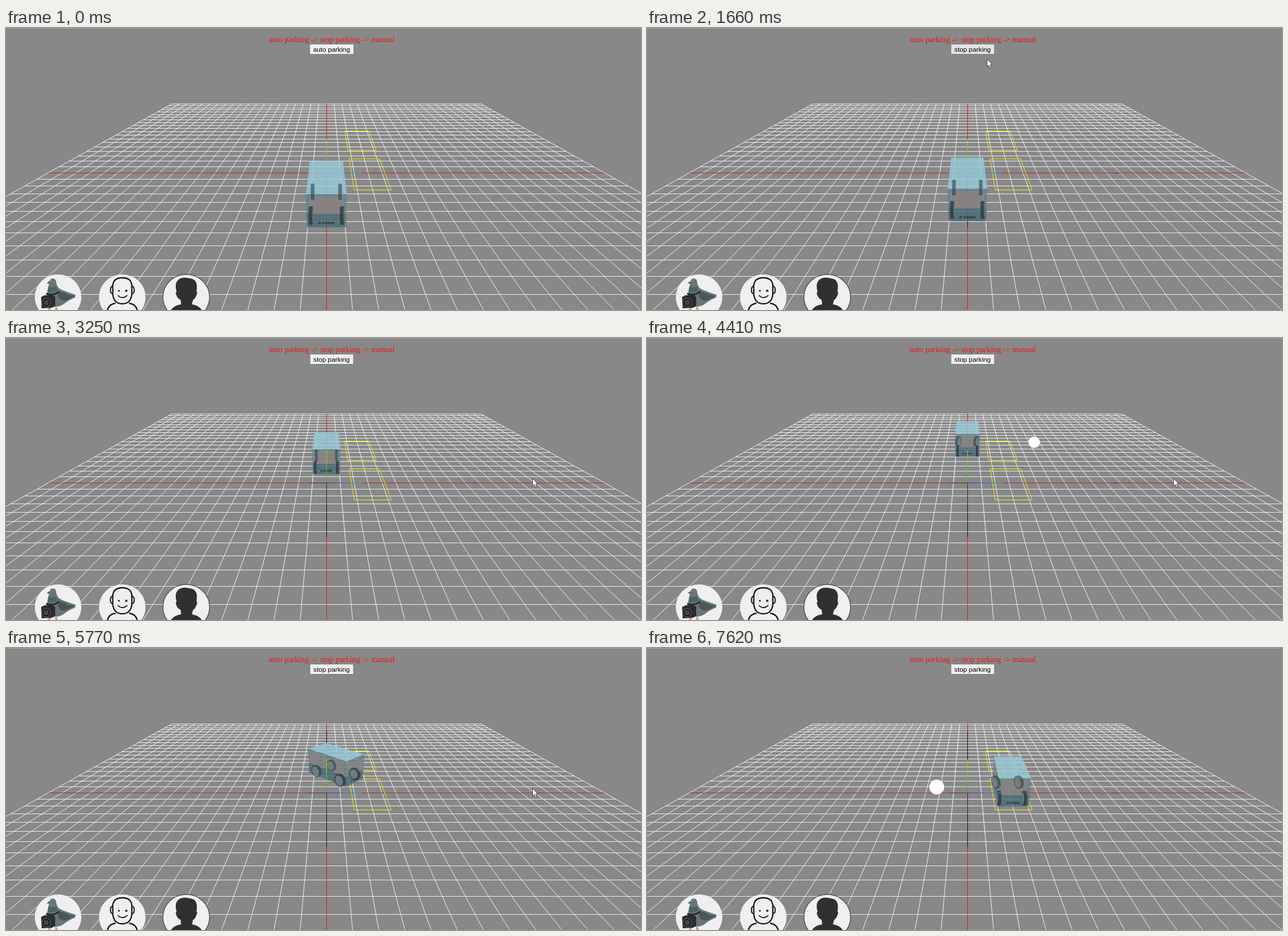
An HTML page with a canvas that plays this animation: 1122x499 px, repeating every 8260 ms.

```html
<!DOCTYPE html>
<html lang="en">
<head>
<meta charset="utf-8">
<title>Auto parking</title>
<style>
  html, body { margin: 0; width: 100%; height: 100%; overflow: hidden; background: #888; }
  canvas { display: block; }
</style>
</head>
<body>
<canvas id="stage" width="1122" height="499"></canvas>
<script>
const ctx = document.getElementById('stage').getContext('2d');
const LOOP = 8260;
const CX = 566.1, CY = 256.1, FOCAL = 549;
const DIST = Math.hypot(5, 10), SIN = 5 / DIST, COS = 10 / DIST;

// Parking manoeuvre: straight ahead, arc to the right, arc to the left.
const R = 2.53, AXLE = 0.55, WHEEL_Z = 0.65;
const TURN = Math.acos(1 - 0.75 / R);
const START_Z = 2.79, TURN_Z = -2.98, END_Z = 0.57;

const clamp = v => Math.min(1, Math.max(0, v));
const span = (t, a, b) => clamp((t - a) / (b - a));
const ease = p => (1 - Math.cos(Math.PI * p)) / 2;
const mix = (a, b, p) => a + (b - a) * p;
const pixelCentre = v => Math.floor(v) + 0.5;

function project(x, y, z) {
  const depth = DIST - COS * z - SIN * y, scale = FOCAL / depth;
  return { x: CX + x * scale, y: CY - (COS * y - SIN * z) * scale, scale, depth };
}

function fillPoly(points, color) {
  ctx.beginPath();
  points.forEach(p => ctx.lineTo(p.x, p.y));
  ctx.closePath();
  ctx.fillStyle = color;
  ctx.fill();
}

// Axis-aligned lines are snapped so that they stay one crisp pixel wide.
function line(x1, y1, x2, y2, color) {
  if (Math.abs(x1 - x2) < 0.01) x1 = x2 = pixelCentre(x1);
  if (Math.abs(y1 - y2) < 0.01) y1 = y2 = pixelCentre(y1);
  ctx.beginPath();
  ctx.moveTo(x1, y1);
  ctx.lineTo(x2, y2);
  ctx.strokeStyle = color;
  ctx.lineWidth = 1;
  ctx.stroke();
}

function groundLine(x1, z1, x2, z2, color) {
  const a = project(x1, 0, z1), b = project(x2, 0, z2);
  line(a.x, a.y, b.x, b.y, color);
}

function drawGrid() {
  for (let i = -20; i <= 20; i++) {
    if (!i) continue;
    groundLine(i / 2, -10, i / 2, 10, '#f4f4f4');
    groundLine(-10, i / 2, 10, i / 2, '#f0f0f0');
  }
  groundLine(-10, 0, 10, 0, '#d81c1c');
  groundLine(0, -10, 0, 10, '#f01010');
}

function drawSlot(z) {
  const far = z - 1.25, near = z + 1.25, color = '#f4f000';
  groundLine(0.9, far, 2.1, far, color);
  groundLine(0.9, near, 2.1, near, color);
  groundLine(0.9, far, 0.9, near, color);
  groundLine(2.1, far, 2.1, near, color);
}

// Lines the car has passed over stay discoloured.
function drawTrail(t, car) {
  if (t > 620) line(825, CY, 834, CY, '#343c3c');
  if (t < 1200) return;
  const front = t > 4480 ? -8.3 : car.z + 0.3;
  const back = 3.24;
  if (front >= back) return;
  for (const x of [-0.5, 0.5]) groundLine(x, front, x, back, '#cfe4e9');
  groundLine(0, front, 0, back, '#141010');
  if (front < 0) {
    groundLine(0, 0, 0, Math.min(back, 1.5), '#581616');
    line(533, CY, 566, CY, '#5c2c2c');
  }
}

function drawAxes() {
  const tip = project(0, 1.25, 0);
  const up = ctx.createLinearGradient(0, CY, 0, tip.y);
  up.addColorStop(0, '#20c010');
  up.addColorStop(1, '#a8e000');
  line(CX, CY, CX, tip.y, up);
  const side = ctx.createLinearGradient(CX, 0, CX + 62, 0);
  side.addColorStop(0, '#2434c8');
  side.addColorStop(0.4, '#3060c0');
  side.addColorStop(1, '#5890a0');
  line(CX, CY, CX + 62, CY, side);
}

function carState(t) {
  const first = ease(span(t, 4480, 5390)), second = ease(span(t, 6130, 7640));
  const curve = (span(t, 4035, 4470) - 2 * span(t, 5400, 6130)) / R;
  let x = 0, z = mix(START_Z, TURN_Z, ease(span(t, 1200, 4500))), angle = 0;
  if (second > 0) {
    angle = TURN * (1 - second);
    x = 1.5 - R + R * Math.cos(angle);
    z = END_Z - R * Math.sin(angle);
  } else if (first > 0) {
    angle = TURN * first;
    x = R - R * Math.cos(angle);
    z = TURN_Z + R * Math.sin(angle);
  }
  return { x, z, angle, curve };
}

function hull(points) {
  const sorted = [...points].sort((a, b) => a.x - b.x || a.y - b.y);
  const half = list => list.reduce((out, p) => {
    while (out.length > 1) {
      const [a, b] = out.slice(-2);
      if ((b.x - a.x) * (p.y - a.y) - (b.y - a.y) * (p.x - a.x) > 0) break;
      out.pop();
    }
    out.push(p);
    return out;
  }, []);
  return [...half(sorted).slice(0, -1), ...half(sorted.reverse()).slice(0, -1)];
}

function drawCar(car) {
  const s = Math.sin(car.angle), c = Math.cos(car.angle);
  const at = (x, y, z) =>
    project(car.x + c * x + s * (z - AXLE), y, car.z - s * x + c * (z - AXLE));
  const W = 0.515, L = 1.01, H = 1.02, SILL = 0.43;

  function drawFace(point, windows) {
    const quad = (u0, u1, h0, h1) =>
      [point(u0, h0), point(u1, h0), point(u1, h1), point(u0, h1)];
    const [a, b, , d] = quad(0, 1, 0, H);
    if ((b.x - a.x) * (d.y - a.y) - (b.y - a.y) * (d.x - a.x) > 0) return;
    fillPoly(quad(0, 1, 0, SILL), 'rgba(72,108,119,.8)');
    fillPoly(quad(0, 1, SILL, H), 'rgba(92,130,141,.74)');
    for (const [u0, u1] of windows) {
      fillPoly(quad(u0, u1, SILL, 0.95), 'rgba(142,130,127,.76)');
    }
  }

  const sideWindows = [[0.05, 0.34], [0.39, 0.65], [0.7, 0.95]];
  drawFace((u, h) => at(-W, h, mix(-L, L, u)), sideWindows);
  drawFace((u, h) => at(W, h, mix(L, -L, u)), sideWindows);
  drawFace((u, h) => at(mix(-W, W, u), h, L), [[0.1, 0.9]]);

  fillPoly([at(-W, H, -L), at(W, H, -L), at(W, H, L), at(-W, H, L)], 'rgba(148,200,214,.84)');

  function drawWheel(x, z, steer, strength) {
    const ss = Math.sin(steer), cs = Math.cos(steer), half = 0.05;
    const disc = (offset, radius) => Array.from({ length: 24 }, (_, i) => {
      const a = i * Math.PI / 12, roll = radius * Math.cos(a);
      return at(x + cs * offset - ss * roll, 0.13 + radius * Math.sin(a), z + ss * offset + cs * roll);
    });
    const depth = o => at(x + cs * o, 0.13, z + ss * o).depth;
    const near = depth(-half) < depth(half) ? -half : half;
    ctx.globalAlpha = strength;
    fillPoly(hull([...disc(-half, 0.25), ...disc(half, 0.25)]), '#2a363a');
    ctx.globalAlpha = 0.85;
    fillPoly(disc(near, 0.2), '#76868a');
    ctx.globalAlpha = 1;
  }

  const steer = Math.atan(2 * WHEEL_Z * car.curve);
  for (const x of [-0.43, 0.43]) {
    drawWheel(x, -WHEEL_Z, steer, 0.55);
    drawWheel(x, WHEEL_Z, 0, 0.75);
  }

  // Number plate, laid onto the rear face.
  const o = at(0, 0.13, L), right = at(0.1, 0.13, L), up = at(0, 0.23, L);
  ctx.save();
  ctx.transform((right.x - o.x) / 10, (right.y - o.y) / 10,
    (o.x - up.x) / 10, (o.y - up.y) / 10, o.x, o.y);
  ctx.font = 'bold 11px "Liberation Sans", sans-serif';
  ctx.textAlign = 'center';
  ctx.textBaseline = 'middle';
  ctx.fillStyle = '#252b2d';
  ctx.fillText('B·K8888', 0, 0);
  ctx.restore();
}

function drawPivot(car) {
  if (Math.abs(car.curve) < 0.02) return;
  const reach = 1 / car.curve;
  const p = project(car.x + Math.cos(car.angle) * reach, 0.5, car.z - Math.sin(car.angle) * reach);
  if (p.depth < 0.5) return;
  circle(p.x, p.y, 0.25 * p.scale, '#fff');
}

function circle(x, y, r, fill, stroke, width = 1) {
  ctx.beginPath();
  ctx.arc(x, y, r, 0, 7);
  if (fill) { ctx.fillStyle = fill; ctx.fill(); }
  if (stroke) { ctx.strokeStyle = stroke; ctx.lineWidth = width; ctx.stroke(); }
}

function shape(path, fill, stroke, width = 1) {
  const p = new Path2D(path);
  if (fill) { ctx.fillStyle = fill; ctx.fill(p); }
  if (stroke) { ctx.strokeStyle = stroke; ctx.lineWidth = width; ctx.stroke(p); }
}

function badge(x, draw) {
  ctx.save();
  ctx.translate(x, 476);
  ctx.beginPath();
  ctx.ellipse(0, 0, 41.2, 40, 0, 0, 7);
  ctx.fillStyle = '#efefef';
  ctx.fill();
  ctx.save();
  ctx.clip();
  draw();
  ctx.restore();
  ctx.strokeStyle = '#505050';
  ctx.lineWidth = 1.4;
  ctx.stroke();
  ctx.restore();
}

function drawPigeon() {
  shape('M-14 18L-17 25M-4 18L-2 25', null, '#cf9c8d', 4);
  shape('M-16 -24Q-15 -33 -9 -33Q-3 -32 -3 -24Q-1 -15 8 -12Q18 -8 31 -4L30 1Q18 6 12 11Q4 18 -8 17Q-20 10 -19 -7Z', '#687679');
  shape('M0 -10Q12 -9 18 -4L30 -2L14 6Q5 8 0 0Z', '#4c565a');
  shape('M-17 -19Q-11 -15 -4 -19L-1 -11Q-10 -7 -19 -9Z', '#4a6562');
  shape('M-16 -28L-20 -24L-15 -24Z', '#45484b');
  circle(-11, -28, 1.3, '#b9704b');
  shape('M-21 -6Q-8 -1 2 -10', null, '#25282a', 3);
  shape('M-30 0L-24 -3L-10 -4L-5 0V16L-11 19L-29 20Z', '#2a2d2f');
  circle(-21, 10, 7.5, '#171a1c', '#50585b', 1.3);
  circle(-21, 10, 3.6, '#384247', '#6c777b');
}

function drawSmile() {
  shape('M-27 30Q-27 13 -12 11M27 30Q27 13 12 11', null, '#171717', 2.4);
  shape('M-17 -18Q-17 -34 0 -34Q17 -34 17 -18V-7Q16 12 0 12Q-16 12 -17 -7Z', '#efefef', '#171717', 2.3);
  shape('M-17 -19Q-21 -19 -21 -12Q-21 -6 -17 -6ZM17 -19Q21 -19 21 -12Q21 -6 17 -6Z', '#efefef', '#171717', 2);
  circle(-6, -11, 1.6, '#171717');
  circle(7, -11, 1.6, '#171717');
  shape('M-8 -3Q0 5 9 -3', null, '#171717', 1.7);
}

function drawSilhouette() {
  shape('M-17 -9Q-22 -26 -12 -32Q-5 -36 6 -33Q22 -32 18 -10Q21 -9 17 -1Q15 4 12 5L10 13Q26 15 31 30H-30Q-26 15 -9 13L-10 5Q-15 3 -17 -2Q-20 -9 -17 -9Z', '#302f31');
}

function drawHeader(t) {
  ctx.textAlign = 'center';
  ctx.textBaseline = 'alphabetic';
  ctx.fillStyle = '#f01414';
  ctx.font = '14.18px "Liberation Serif", serif';
  ctx.fillText('auto parking -> stop parking -> manual', 575.5, 25);
  const started = t >= 1130, half = started ? 38.5 : 39;
  const hover = t > 860 && t < 1720;
  ctx.beginPath();
  ctx.roundRect(575.5 - half, 28.5, half * 2, 18, 1.5);
  ctx.fillStyle = hover ? '#e3e3e3' : '#efefef';
  ctx.fill();
  ctx.strokeStyle = '#767676';
  ctx.lineWidth = 1;
  ctx.stroke();
  ctx.fillStyle = '#000';
  ctx.font = '11.83px "Liberation Sans", sans-serif';
  ctx.fillText(started ? 'stop parking' : 'auto parking', 575.2, 42);
}

const pointerKeys = [
  [70, 1055, 447], [220, 1055, 447], [900, 590, 39], [1450, 590, 39], [1660, 600, 54],
  [1870, 706, 154], [2750, 903, 235], [2950, 930, 248], [7080, 930, 248], [7600, 1088, 468]
];

function drawPointer(t) {
  const next = pointerKeys.findIndex(k => k[0] > t);
  if (next < 1) return;
  const [t0, x0, y0] = pointerKeys[next - 1], [t1, x1, y1] = pointerKeys[next];
  const p = span(t, t0, t1);
  ctx.save();
  ctx.translate(mix(x0, x1, p), mix(y0, y1, p));
  shape('M.5 .5V14L3.4 11.2L5.5 16.2L7.8 15.2L5.7 10.4H9.6Z', '#fff', '#3a3a3a', 0.9);
  ctx.restore();
}

function render(t) {
  ctx.fillStyle = '#888';
  ctx.fillRect(0, 0, 1122, 499);
  ctx.fillStyle = '#a6a6a6';
  ctx.fillRect(0, 0, 1122, 1);
  const car = carState(t);
  drawGrid();
  drawTrail(t, car);
  drawSlot(0);
  drawSlot(-3.35);
  const axesInFront = car.z < 0 || car.x > 0;
  if (!axesInFront) drawAxes();
  drawCar(car);
  if (axesInFront) drawAxes();
  drawPivot(car);
  badge(92, drawPigeon);
  badge(205.5, drawSmile);
  badge(318.5, drawSilhouette);
  drawHeader(t);
  drawPointer(t);
}

const began = performance.now();
function tick() {
  render((performance.now() - began) % LOOP);
  requestAnimationFrame(tick);
}
tick();
</script>
</body>
</html>
```
